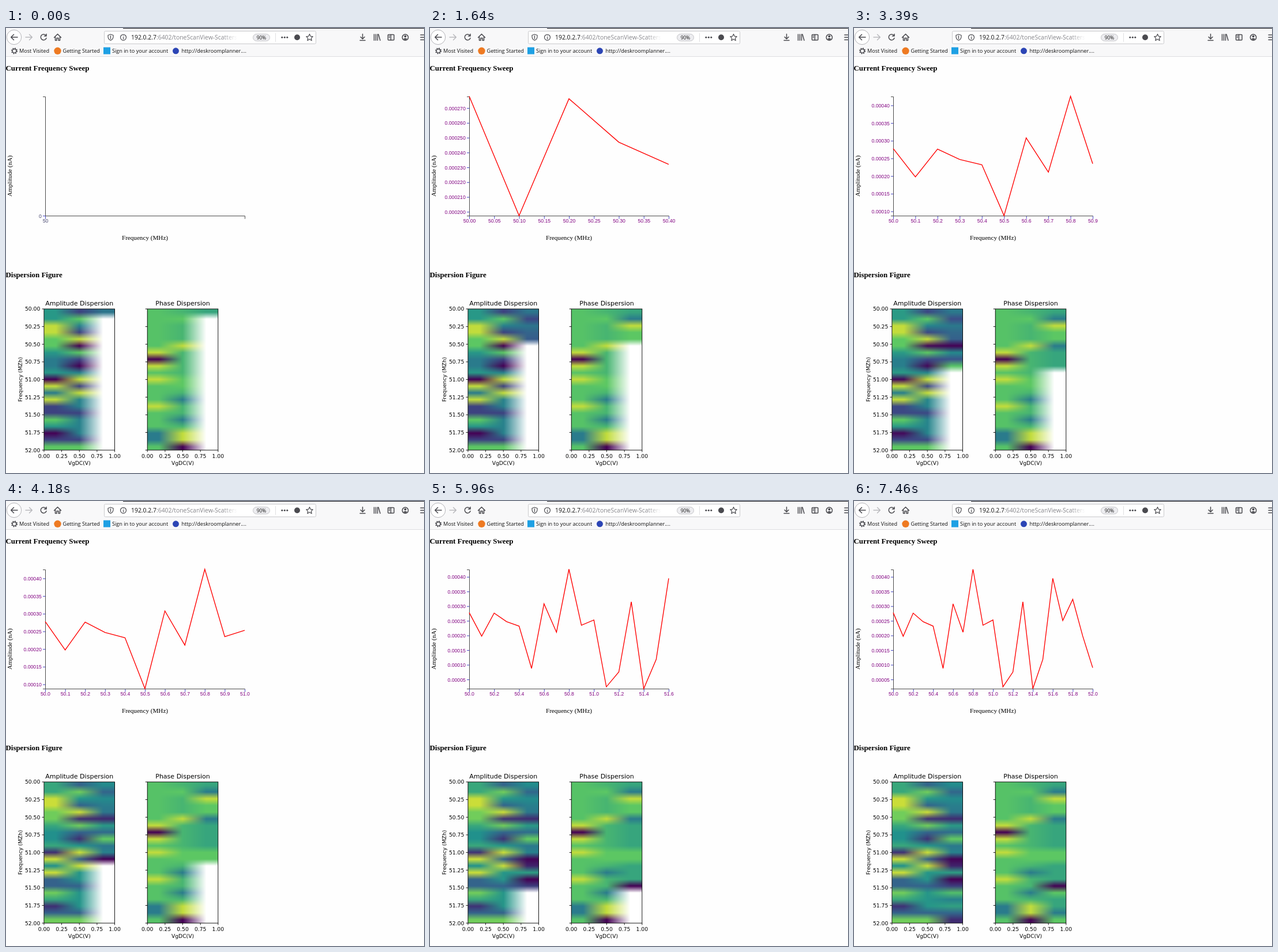
Animation, 725 px wide and 773 px high, one loop 8 s. Source, as an HTML page with a canvas:

```html
<!DOCTYPE html>
<html lang="en">
<head>
<meta charset="utf-8">
<title>Frequency sweep</title>
<style>
  html, body { margin: 0; width: 725px; height: 773px; overflow: hidden; background: #fefefe; }
  body { position: relative; }
  canvas { position: absolute; top: 488px; width: 123px; height: 245px; }
  #amp { left: 66px; }
  #phase { left: 245px; }
  svg { position: absolute; left: 0; top: 0; }
  .ui { font-family: "Open Sans", "Noto Sans", sans-serif; fill: #111; }
  .serif { font-family: "Liberation Serif", "Times New Roman", serif; }
  .plot { font-family: "DejaVu Sans", sans-serif; font-size: 9.2px; }
  .axis { font-family: "Liberation Sans", Arial, sans-serif; font-size: 8.7px; }
  .icon { fill: none; stroke: #4a4a4f; stroke-width: 1.5; stroke-linecap: round; stroke-linejoin: round; }
</style>
</head>
<body>
<canvas id="amp" width="123" height="245"></canvas>
<canvas id="phase" width="123" height="245"></canvas>
<svg width="725" height="773" viewBox="0 0 725 773">
  <defs>
    <linearGradient id="fade" gradientUnits="userSpaceOnUse" x1="217" x2="401" y1="0" y2="0">
      <stop offset=".86" stop-color="#fff"/>
      <stop offset="1" stop-color="#fff" stop-opacity="0"/>
    </linearGradient>
    <mask id="urlMask" maskUnits="userSpaceOnUse" x="217" y="5" width="184" height="23">
      <rect x="217" y="5" width="184" height="23" fill="url(#fade)"/>
    </mask>
  </defs>

  <!-- browser toolbar -->
  <rect width="725" height="49" fill="#f8f8f9"/>
  <path d="M203 .5H725" stroke="#16161c"/>
  <path d="M0 49.5H725" stroke="#dedee0"/>
  <circle cx="14" cy="16" r="12.7" fill="#fff" stroke="#b4b4b8"/>
  <g class="icon">
    <path d="M20 16H9M13.5 11.2L8.7 16L13.5 20.8"/>
    <path d="M34 16H45M40.5 11.2L45.3 16L40.5 20.8" stroke="#b9b9bd"/>
    <path d="M69.3 13A5 5 0 1 0 70 17.5M70 10.5V14H66.5"/>
    <path d="M83.5 16.5L89.5 10.5L95.5 16.5M85.5 15.5V21.5H88V17.5H91V21.5H93.5V15.5"/>
  </g>
  <rect x="170.5" y="5.5" width="367" height="22" rx="2" fill="#fff" stroke="#c9c9cc"/>
  <g class="icon" style="stroke-width: 1.2">
    <path d="M181.5 11L186 12.5V15Q186 19.5 181.5 21.5Q177 19.5 177 15V12.5Z"/>
    <path d="M181.5 13.5V19"/>
    <circle cx="203.5" cy="16.3" r="5"/>
    <path d="M203.5 15.8V19M203.5 13.5V13.6"/>
    <path d="M526.5 10.5L528.3 14.4L532.3 14.8L529.3 17.6L530.2 21.8L526.5 19.6L522.8 21.8L523.7 17.6L520.7 14.8L524.7 14.4Z"/>
  </g>
  <g mask="url(#urlMask)">
    <text class="ui" x="217" y="20" font-size="10.4">192.0.2.7<tspan fill="#85858a">:6402/toneScanView-Scatters</tspan></text>
  </g>
  <rect x="428.5" y="10.5" width="29" height="12" rx="6" fill="#ededf0" stroke="#c4c4c8"/>
  <text class="ui" x="443" y="19.8" font-size="8.4" text-anchor="middle">90%</text>
  <path d="M467.5 9V24" stroke="#e0e0e2"/>
  <g fill="#4a4a4f">
    <circle cx="478.8" cy="16.3" r="1.5"/><circle cx="483.3" cy="16.3" r="1.5"/><circle cx="487.8" cy="16.3" r="1.5"/>
    <circle cx="505" cy="16.3" r="5"/>
  </g>
  <g class="icon">
    <path d="M618.5 10.5V18.5M615 15.5L618.5 19L622 15.5M614 21.5H623"/>
    <path d="M638.5 11V21.5M641.5 11V21.5M644.5 11V21.5M646 11L649 21.5"/>
    <rect x="662.5" y="11.5" width="10.5" height="9.5" rx="1"/>
    <path d="M667.5 11.5V21M664.5 14H665.5M664.5 16.5H665.5"/>
    <circle cx="692.5" cy="16.3" r="5.2"/>
    <path d="M719 12H725M719 16.3H725M719 20.6H725"/>
  </g>
  <path d="M689 19.3Q692.5 15.5 696 19.3L692.5 21Z" fill="#4a4a4f"/>
  <circle cx="692.5" cy="14.5" r="2" fill="#4a4a4f"/>
  <circle cx="14.5" cy="39.8" r="4.6" fill="none" stroke="#4a4a4f" stroke-width="2" stroke-dasharray="1.8 1.813"/>
  <circle cx="14.5" cy="39.8" r="3.3" fill="none" stroke="#4a4a4f" stroke-width="1.3"/>
  <circle cx="89.5" cy="39.8" r="6.2" fill="#ee7a22"/>
  <rect x="169" y="33.5" width="12" height="12" fill="#1ea0e4"/>
  <circle cx="294.5" cy="39.8" r="5.5" fill="#2c45b5"/>
  <g class="ui" font-size="9.15">
    <text x="23" y="43.2">Most Visited</text>
    <text x="98.5" y="43.2">Getting Started</text>
    <text x="184" y="43.2">Sign in to your account</text>
    <text x="304.5" y="43.2">http://deskroomplanner....</text>
  </g>

  <!-- page text -->
  <g class="serif">
    <text x="-.5" y="74" font-size="12.9" font-weight="700">Current Frequency Sweep</text>
    <text x="-.5" y="433" font-size="12.9" font-weight="700">Dispersion Figure</text>
    <text x="241" y="367.5" font-size="11.15" text-anchor="middle">Frequency (MHz)</text>
    <text transform="translate(10 257) rotate(-90)" font-size="11.15" text-anchor="middle">Amplitude (nA)</text>
  </g>

  <path d="M64 119.5H68.5V326.5H64M68.5 331.5V326.5H414.5V331.5" fill="none" stroke="#4c4c4c"/>
  <g id="ticks" class="axis"></g>
  <path id="line" fill="none" stroke="#f00" stroke-width="1.35"/>
  <g id="frames" class="plot"></g>
</svg>
<script>
const LOOP = 8000, ROWS = 21;

// Amplitude in units of 1e-6 nA, one reading every 0.1 MHz from 50 MHz
const sweep = [278, 197.4, 276.3, 247, 232, 87.8, 308, 211, 426, 235, 253,
  24.8, 75.5, 315, 18.6, 118.5, 395, 251, 323.5, 198, 90];
const FLOOR = Math.min(...sweep), CEILING = 556;

const LEVEL = { dark: .15, blue: .32, teal: .5, lime: .78, yellow: .92 };

// An even column with a few rows that stand out
function column(base, bands) {
  const col = Array(ROWS).fill(base);
  for (const name in bands) bands[name].forEach(row => col[row] = LEVEL[name]);
  return col;
}

const ampCols = [
  column(.6, { dark: [10, 18], blue: [14, 15, 19], teal: [7, 8, 12], lime: [4, 5, 16, 20], yellow: [2, 3, 11, 13] }),
  column(.52, { dark: [5, 8], blue: [0, 3, 7, 11, 15, 19], lime: [1, 6, 20], yellow: [4, 10, 12] }),
  sweep.map(v => (v - FLOOR) / (CEILING - FLOOR))
];
const phaseCols = [
  column(.76, { dark: [7], teal: [18, 19], yellow: [6, 8, 10, 14] }),
  column(.71, { dark: [20], teal: [13, 16], lime: [1, 10, 11], yellow: [5, 18, 19] }),
  column(.65, { dark: [15], teal: [1, 5, 19], lime: [3, 4, 10, 11, 16, 20], yellow: [2] })
];

const palette = ['440154', '3b528b', '21918c', '5ec962', 'fde725']
  .map(hex => [0, 2, 4].map(i => parseInt(hex.slice(i, i + 2), 16)));

const $ = id => document.getElementById(id);
const clamp = (v, lo, hi) => Math.min(hi, Math.max(lo, v));
const mix = (a, b, t) => a + (b - a) * t;

function add(parent, tag, attrs, text) {
  const el = document.createElementNS('http://www.w3.org/2000/svg', tag);
  for (const key in attrs) el.setAttribute(key, attrs[key]);
  if (text !== undefined) el.textContent = text;
  parent.append(el);
}

// Round steps of 1, 2 or 5 giving about ten ticks
function tickStep(span) {
  const raw = span / 10;
  const power = 10 ** Math.floor(Math.log10(raw) + 1e-9);
  const err = raw / power;
  return power * (err >= Math.sqrt(50) ? 10 : err >= Math.sqrt(10) ? 5 : err >= Math.sqrt(2) ? 2 : 1);
}

function tickValues(lo, hi, step) {
  const out = [];
  for (let i = Math.ceil(lo / step - 1e-6); i * step <= hi + step * 1e-6; i++) out.push(i * step);
  return out;
}

function xTick(x, label, color = '#800080') {
  add($('ticks'), 'path', { d: `M${x} 327V331.5`, stroke: '#4646c8' });
  add($('ticks'), 'text', { x, y: 338.3, fill: color, 'text-anchor': 'middle' }, label);
}

function yTick(y, label, color = '#800080') {
  add($('ticks'), 'path', { d: `M64 ${y}H68`, stroke: '#4646c8' });
  add($('ticks'), 'text', { x: 61.8, y: y + 3, fill: color, 'text-anchor': 'end' }, label);
}

function drawSweep(n) {
  $('ticks').replaceChildren();
  if (n === 1) {
    xTick(68.5, '50', '#46466e');
    yTick(326.5, '0', '#46466e');
    $('line').setAttribute('d', '');
    return;
  }
  const shown = sweep.slice(0, n);
  const lo = Math.min(...shown), hi = Math.max(...shown);
  const end = 50 + (n - 1) / 10;
  const xAt = f => 68 + 346 * (f - 50) / (end - 50);
  const yAt = v => 326 - 207.5 * (v - lo) / (hi - lo);

  const xStep = tickStep(end - 50);
  const xDigits = xStep < .099 ? 2 : 1;
  tickValues(50, end, xStep).forEach(f => xTick(xAt(f) + .5, f.toFixed(xDigits)));
  const yStep = tickStep(hi - lo);
  const yDigits = yStep < 15 ? 6 : 5;
  tickValues(lo, hi, yStep).forEach(v => yTick(yAt(v) + .5, (v / 1e6).toFixed(yDigits)));

  $('line').setAttribute('d', 'M' + shown.map((v, i) => `${xAt(50 + i / 10)} ${yAt(v)}`).join('L'));
}

// Premultiplied colour of a cell; empty cells are transparent
function cellColor(t) {
  if (t === null) return [0, 0, 0, 0];
  const last = palette.length - 1;
  const p = clamp(t, 0, 1) * last, i = Math.min(last - 1, Math.floor(p));
  return [...palette[i].map((c, k) => mix(c, palette[i + 1][k], p - i)), 255];
}

// Bilinear blend of three columns; the last one is known only for the first n rows
function drawMap(canvas, cols, n) {
  const known = [cols[0], cols[1], cols[2].map((v, i) => i < n ? v : null)];
  const low = Math.min(...known.flat().filter(v => v !== null));
  const cells = known.map(col => col.map(v => cellColor(v === null ? null : (v - low) / (1 - low))));

  const { width: w, height: h } = canvas;
  const ctx = canvas.getContext('2d');
  const img = ctx.createImageData(w, h);
  for (let y = 0; y < h; y++) {
    const v = clamp((y + .5) / h * ROWS - .5, 0, ROWS - 1), r = Math.min(ROWS - 2, Math.floor(v));
    for (let x = 0; x < w; x++) {
      const u = clamp((x + .5) / w * 3 - .5, 0, 2), c = Math.min(1, Math.floor(u));
      const blend = k => mix(
        mix(cells[c][r][k], cells[c + 1][r][k], u - c),
        mix(cells[c][r + 1][k], cells[c + 1][r + 1][k], u - c), v - r);
      const at = (y * w + x) * 4, paper = 255 - blend(3);
      for (let k = 0; k < 3; k++) img.data[at + k] = blend(k) + paper;
      img.data[at + 3] = 255;
    }
  }
  ctx.putImageData(img, 0, 0);
}

function drawFrame(left, title, yLabels) {
  const g = $('frames');
  add(g, 'rect', { x: left, y: 488, width: 122.6, height: 245.2, fill: 'none', stroke: '#000', 'stroke-width': .9 });
  add(g, 'text', { x: left + 61.3, y: 482.3, 'font-size': 11.02, 'text-anchor': 'middle' }, title);
  add(g, 'text', { x: left + 61.3, y: 759, 'text-anchor': 'middle' }, 'VgDC(V)');
  for (let i = 0; i < 5; i++) {
    const x = left + i * 30.65;
    add(g, 'path', { d: `M${x} 733V736.5`, stroke: '#000', 'stroke-width': .9 });
    add(g, 'text', { x, y: 747, 'text-anchor': 'middle' }, (i / 4).toFixed(2));
  }
  for (let i = 0; i < 9; i++) {
    const y = 488 + i * 30.65;
    add(g, 'path', { d: `M${left - 3.5} ${y}H${left}`, stroke: '#000', 'stroke-width': .9 });
    if (yLabels) add(g, 'text', { x: left - 6.6, y: y + 3.4, 'text-anchor': 'end' }, (50 + i / 4).toFixed(2));
  }
}

drawFrame(65.9, 'Amplitude Dispersion', true);
drawFrame(245.2, 'Phase Dispersion', false);
add($('frames'), 'text', { transform: 'translate(27.5 610.5) rotate(-90)', 'text-anchor': 'middle' }, 'Frequency (MZh)');

// The chart refreshes every 437 ms; each fifth refresh brings two readings
function sweepCount(t) {
  const k = Math.floor((t - 255) / 437);
  return Math.min(ROWS, 2 + k + Math.floor((k + 1) / 5));
}

// The maps refresh every 866 ms with all the readings taken by then, one per 383 ms
function mapCount(t) {
  const refresh = t < 530 ? 0 : t - (t - 530) % 866;
  return Math.min(ROWS, Math.floor(1.81 + refresh / 383));
}

let sweepShown = 0, mapShown = 0;

function tick() {
  const t = performance.now() % LOOP;
  const s = sweepCount(t), m = mapCount(t);
  if (s !== sweepShown) drawSweep(sweepShown = s);
  if (m !== mapShown) {
    mapShown = m;
    drawMap($('amp'), ampCols, m);
    drawMap($('phase'), phaseCols, m);
  }
  requestAnimationFrame(tick);
}
tick();
</script>
</body>
</html>
```
